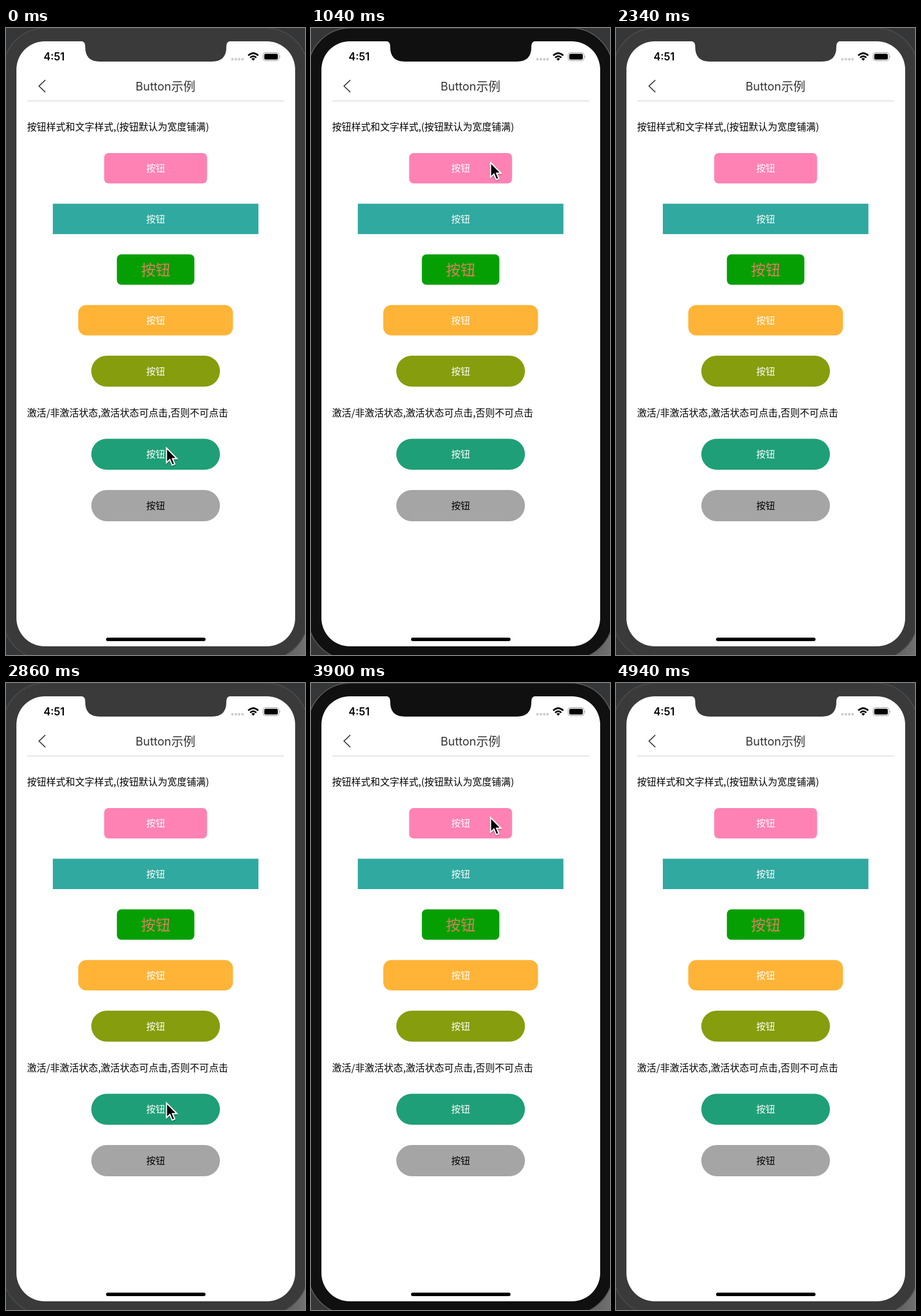
An HTML page that plays this animation: 517 px wide and 1083 px high, repeating every 5.2 s.

```html
<!DOCTYPE html>
<html lang="zh-CN">
<head>
<meta charset="utf-8">
<title>Button示例</title>
<style>
  html, body { margin: 0; width: 100%; height: 100%; overflow: hidden; background: #333; }
  svg { display: block; width: 100%; height: 100%; }
  text { font-family: "Noto Sans CJK SC", "Noto Sans CJK", sans-serif; font-size: 16.6px; }
  .latin { font-family: Inter, Roboto, sans-serif; }
</style>
</head>
<body>
<svg viewBox="0 0 517 1083" preserveAspectRatio="none">
  <defs>
    <linearGradient id="wall" x2="1">
      <stop offset="0" stop-color="#343638"/>
      <stop offset=".85" stop-color="#48494a"/>
      <stop offset="1" stop-color="#707070"/>
    </linearGradient>
    <filter id="shadow" x="-50%" y="-50%" width="200%" height="200%">
      <feDropShadow dx="0" dy="1.5" stdDeviation="1.2" flood-opacity=".35"/>
    </filter>
  </defs>

  <rect width="517" height="1083" fill="#343638"/>
  <rect y="1000" width="517" height="83" fill="url(#wall)"/>
  <rect id="body" x="-5" y="0" width="527" height="1091" rx="73" stroke-width="1.5"/>
  <rect x="18" y="23" width="482" height="1045" rx="49" fill="#fff"/>
  <path id="notch" d="M129 22.5Q137 23 137 31V33Q137 58 162 58H356Q381 58 381 33V31Q381 23 389 22.5Z"/>

  <text class="latin" x="65" y="56" style="font-size:18px;font-weight:600">4:51</text>
  <g fill="#cbcbcb">
    <circle cx="391.5" cy="54" r="2.2"/><circle cx="397.5" cy="54" r="2.2"/>
    <circle cx="403.3" cy="54" r="2.2"/><circle cx="409" cy="54" r="2.2"/>
  </g>
  <g fill="none" stroke="#000" stroke-width="2.8">
    <path d="M418.8 47.6Q427.5 39.4 436.2 47.6"/>
    <path d="M422.2 51.2Q427.5 46.2 432.8 51.2"/>
  </g>
  <path d="M424.4 53.2Q427.5 50.6 430.6 53.2L427.5 56.5Z"/>
  <rect x="444.5" y="42.5" width="27.5" height="14" rx="4" fill="none" stroke="#999"/>
  <rect x="446.5" y="44.5" width="23.5" height="10" rx="2.3"/>
  <path d="M473.3 47Q475.3 49.5 473.3 52Z" fill="#999"/>

  <path d="M68 89.8L57 100.3L68 110.8" fill="none" stroke="#333" stroke-width="1.6"/>
  <text x="224" y="107.5" fill="#333" style="font-size:21px"><tspan class="latin" style="font-size:20px">Button</tspan>示例</text>
  <path d="M37 126H481" stroke="#dcdcdc" stroke-width="1.3"/>

  <text x="36.5" y="177.3">按钮样式和文字样式,(按钮默认为宽度铺满)</text>
  <text x="36.5" y="670.8">激活/非激活状态,激活状态可点击,否则不可点击</text>
  <g id="buttons"></g>
  <rect x="173" y="1053" width="172" height="6" rx="3"/>

  <path id="cursor" d="M0 0V25.2L5.8 19.8L9.9 29.4L14.3 27.5L10.3 18.2H18Z"
        stroke="#fff" stroke-width="2" filter="url(#shadow)"/>
</svg>
<script>
const $ = id => document.getElementById(id);
const NS = 'http://www.w3.org/2000/svg';
const MID = 258.7;

function add(tag, attrs, text = '') {
  const el = document.createElementNS(NS, tag);
  for (const key in attrs) el.setAttribute(key, attrs[key]);
  el.textContent = text;
  $('buttons').append(el);
  return el;
}

function button(y, width, height, rx, fill, color = '#fff', size = 16.3) {
  add('rect', { x: MID - width / 2, y, width, height, rx, fill });
  const label = add('text', { x: MID, y: y + height / 2 + size * 0.38, fill: color, 'text-anchor': 'middle' }, '按钮');
  label.style.fontSize = size + 'px';
}

button(216, 178, 52.5, 8, '#ff82b4');
button(303.5, 355.5, 52.5, 0, '#30a9a0');
button(391, 134, 52.5, 8, '#059f03', '#d8805f', 25.5);
button(478.5, 267.5, 52.5, 14, '#ffb437');
button(566, 222.5, 53.5, 26.7, '#869d0d');
button(709.5, 222.5, 53.5, 26.7, '#1f9f77');
button(798, 222.5, 54, 27, '#a5a5a5', '#000');

// Pointer positions per step; the window loses focus when the pointer is gone
const STEP = 260, STEPS = 20, CYCLE = 11;
const path = [
  [276, 723], [338, 919], [326, 575], [318, 400],
  [309, 230], [370, 460], [416, 705], [410, 502]
];

function draw(ms) {
  const step = Math.floor(ms / STEP) % STEPS % CYCLE;
  const spot = path[step];
  const focused = step > 0 && !!spot;
  $('body').setAttribute('fill', focused ? '#101010' : '#3a3a3a');
  $('body').setAttribute('stroke', focused ? '#5a5a5a' : '#4c4c4c');
  $('notch').setAttribute('fill', focused ? '#101010' : '#3a3a3a');
  $('cursor').setAttribute('visibility', spot ? 'visible' : 'hidden');
  if (spot) $('cursor').setAttribute('transform', `translate(${spot[0] + 1.5} ${spot[1] + 2.5})`);
}

const start = performance.now();
function tick() {
  draw(performance.now() - start);
  requestAnimationFrame(tick);
}
tick();
</script>
</body>
</html>
```
